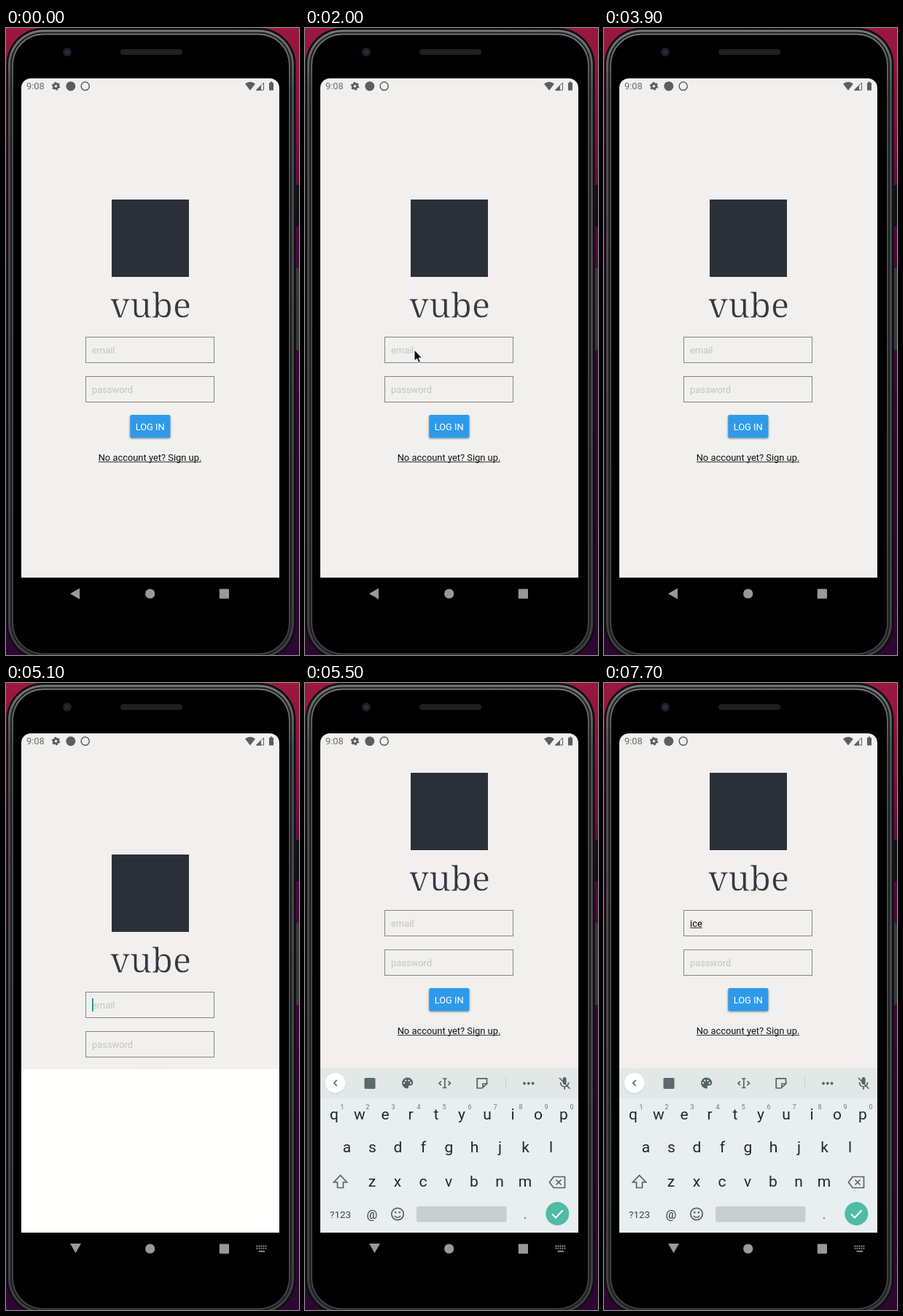
An HTML page that plays this animation: 402 by 859 pixels, repeating every 8 s.

```html
<!DOCTYPE html>
<html lang="en">
<head>
<meta charset="utf-8">
<title>Login screen</title>
<style>
html, body { margin: 0; width: 100%; height: 100%; overflow: hidden; background: #000; }
svg { display: block; width: 100vw; height: 100vh; font: 12.9px Roboto, sans-serif; }
.hint { fill: #c3c3c1; }
.box { fill: none; stroke: #858585; }
.line { fill: none; stroke: #566366; stroke-width: 1.7; }
.mid { text-anchor: middle; }
#keys { font-size: 21px; fill: #1c2a2e; }
#keys .num { font-size: 9px; fill: #6a7679; }
</style>
</head>
<body>
<svg viewBox="0 0 402 859">
  <defs>
    <linearGradient id="wall" x2="0" y2="1">
      <stop offset="0" stop-color="#9b183f"/>
      <stop offset=".16" stop-color="#7d1040"/>
      <stop offset=".3" stop-color="#500a40"/>
      <stop offset=".6" stop-color="#360732"/>
      <stop offset="1" stop-color="#2d0632"/>
    </linearGradient>
    <linearGradient id="rim" x2="0" y2="1">
      <stop offset="0" stop-color="#75787a"/>
      <stop offset=".1" stop-color="#4a4d4f"/>
      <stop offset="1" stop-color="#3e4143"/>
    </linearGradient>
    <clipPath id="corners"><path d="M21 753V82a13 13 0 0 1 13-13H362a13 13 0 0 1 13 13V753Z"/></clipPath>
    <clipPath id="view"><rect id="viewBox" x="21" y="69" width="354" height="684"/></clipPath>
    <filter id="soft" x="-20%" y="-20%" width="140%" height="150%"><feGaussianBlur stdDeviation="1.4"/></filter>
  </defs>

  <!-- phone -->
  <rect width="402" height="859" fill="url(#wall)"/>
  <path d="M398 215h4v57h-4z" fill="#111114"/>
  <path d="M398 329h4v112h-4z" fill="#39393b"/>
  <rect x=".5" y="0" width="397" height="866" rx="50" fill="#0d0e10"/>
  <rect x="3" y="2.5" width="392" height="861" rx="48" fill="url(#rim)"/>
  <rect x="6" y="5.5" width="386" height="855" rx="45" fill="#1b1d1f"/>
  <rect x="8" y="7.5" width="382" height="851" rx="43" fill="url(#rim)"/>
  <rect x="10" y="9.5" width="378" height="847" rx="41"/>
  <circle cx="84" cy="33" r="6" fill="#1d1f24"/>
  <circle cx="84" cy="33" r="3" fill="#262c48"/>
  <rect x="157" y="29" width="85" height="8" rx="4" fill="#202022"/>

  <!-- screen -->
  <g clip-path="url(#corners)">
    <path d="M21 528H375V753H21Z" fill="#fffffd"/>
    <g clip-path="url(#view)">
      <path d="M21 69H375V753H21Z" fill="#f1f0ee"/>
      <g id="form">
        <rect x="145" y="235" width="106" height="106" fill="#2b3038"/>
        <text x="198.5" y="397" class="mid" font-family="Noto Serif, serif" font-size="47" fill="#343842" stroke="#f1f0ee" stroke-width=".8">vube</text>
        <rect class="box" x="109.5" y="423.5" width="176" height="35"/>
        <rect class="box" x="109.5" y="477.5" width="176" height="35"/>
        <text id="mail" x="118" y="446"></text>
        <path id="rule" stroke="#222" stroke-width=".9"/>
        <rect id="caret" y="432" width="1.8" height="18" fill="#0f967f"/>
        <text x="118" y="499.5" class="hint">password</text>
        <rect x="170" y="531.5" width="55.5" height="31" rx="2" fill="#0006" filter="url(#soft)"/>
        <rect x="170.3" y="530" width="55" height="31.5" rx="2" fill="#2f9aea"/>
        <text x="197.7" y="551" class="mid" fill="#fff">LOG IN</text>
        <text x="197.5" y="593" class="mid" fill="#111">No account yet? Sign up.</text>
        <path d="M127 594.5H268" stroke="#222" stroke-width=".9"/>
      </g>
    </g>
  </g>

  <!-- status bar -->
  <g fill="#5d5d5d">
    <text x="28" y="84" fill="#6c6c6c">9:08</text>
    <circle cx="68.5" cy="79.7" r="3.2" fill="none" stroke="#5d5d5d" stroke-width="2.8"/>
    <circle cx="68.5" cy="79.7" r="5" fill="none" stroke="#5d5d5d" stroke-width="1.6" stroke-dasharray="2.6 2.636"/>
    <circle cx="88.8" cy="79.7" r="6.5"/>
    <circle cx="108.7" cy="79.7" r="5.6" fill="none" stroke="#5d5d5d" stroke-width="1.5"/>
    <path d="M328 76.5Q335 71 342 76.5L335 85.5Z"/>
    <path d="M343.5 85 353.5 75V85Z" fill="none" stroke="#5d5d5d"/>
    <path d="M343 85.5 350 78.5V85.5Z"/>
    <path d="M361 75h1.7v-1.5h2.6v1.5h1.7v10.5h-6z"/>
  </g>

  <!-- navigation bar -->
  <g fill="#999">
    <path id="back"/>
    <circle cx="197.7" cy="775" r="6.6"/>
    <rect x="292.8" y="768.5" width="13.2" height="13.2" rx="1"/>
    <g id="switch" stroke="#999" stroke-width="1.8" stroke-dasharray="1.8 1.2">
      <path d="M343.5 771.5H358M343.5 774.7H358"/>
      <path d="M346.5 778.6H355" stroke-dasharray="none"/>
    </g>
  </g>

  <!-- keyboard, at rest position -->
  <g id="board">
    <path d="M21 528H375V753H21Z" fill="#e9eef0"/>
    <path d="M21 528H375V569H21Z" fill="#e2e8e5"/>
    <circle cx="41.5" cy="549" r="14" fill="#b9c0be" opacity=".5"/>
    <circle cx="41.5" cy="548" r="13.8" fill="#fff"/>
    <path class="line" d="M43.8 544l-4 4 4 4" stroke="#333"/>
    <rect x="81.5" y="541" width="15" height="15" rx="1.5" fill="#5d696c"/>
    <path d="M140.5 540.5a7.5 7.5 0 1 0 0 15c2.5 0 1-2.6 1.4-3.3 1-1.5 6.3.6 6.3-4.4 0-4-3.5-7.3-7.7-7.3" fill="#566366"/>
    <g fill="#e2e8e5"><circle cx="136" cy="548" r="1.2"/><circle cx="138.3" cy="544.6" r="1.2"/><circle cx="142.6" cy="544.6" r="1.2"/><circle cx="145" cy="548" r="1.2"/></g>
    <path class="line" d="M189 542h5.5M189 554.5h5.5M191.8 542v12.5M187 545.5l-3 2.8 3 2.8M196.5 545.5l3 2.8-3 2.8"/>
    <path class="line" d="M249.5 549V541.8H236.2V555H243l6.5-6H244v5"/>
    <path d="M275.5 539v18" stroke="#cbd2d0"/>
    <g fill="#566366"><circle cx="301" cy="548.5" r="1.9"/><circle cx="306.8" cy="548.5" r="1.9"/><circle cx="312.6" cy="548.5" r="1.9"/></g>
    <rect x="353.6" y="540" width="5" height="10" rx="2.5" fill="#566366"/>
    <path class="line" d="M350.5 547q.5 6 5.6 6 5-.1 5.6-6M356.1 553v4M349 541l14.5 15"/>
    <g id="keys"></g>
    <path class="line" d="M48.5 674.5 39.5 684H44.5V691.5H52.5V684H57.5Z"/>
    <path class="line" d="M341 676.5H356.5V691.5H341L335.5 684ZM344.5 680.5l7 7M351.5 680.5l-7 7"/>
    <text x="34" y="732.5" font-size="13.5" fill="#3a474a">?123</text>
    <text x="92" y="734" class="mid" font-size="16.5" fill="#2c393c">@</text>
    <circle class="line" cx="127" cy="727.5" r="8.2"/>
    <path class="line" d="M122.8 730q4.2 4.5 8.4 0"/>
    <circle cx="124.2" cy="725.3" r="1.3" fill="#566366"/><circle cx="129.8" cy="725.3" r="1.3" fill="#566366"/>
    <rect x="153" y="717" width="123.5" height="21.5" rx="2.5" fill="#c8cdcf"/>
    <text x="302" y="734" class="mid" font-size="17" fill="#2c393c">.</text>
    <circle cx="346.3" cy="727" r="16" fill="#4ebca6"/>
    <path d="M339 727.5l5 5 9.5-10" fill="none" stroke="#fff" stroke-width="2"/>
  </g>

  <path id="mouse" d="M0 0V15L3.5 12 6 17.5 8.5 16.4 6 11H10.5Z" fill="#111" stroke="#fff" stroke-width=".9"/>
</svg>
<script>
const $ = id => document.getElementById(id);
const set = (id, attrs) => { for (const k in attrs) $(id).setAttribute(k, attrs[k]); };
const show = (id, on) => set(id, { visibility: on ? 'visible' : 'hidden' });

const label = (x, y, text, cls) => `<text x="${x}" y="${y}" class="mid ${cls}">${text}</text>`;
const rows = [['qwertyuiop', 40, 598], ['asdfghjkl', 57.5, 643], ['zxcvbnm', 92, 690]];
$('keys').innerHTML = rows.map(([letters, x, y], row) => [...letters].map((c, i) =>
  label(x + 35 * i, y, c, '') + (row ? '' : label(x + 35 * i + 11, 584, (i + 1) % 10, 'num'))
).join('')).join('');

const blinks = [400, 900, 1400, 1900, 2400, 2900, 3500, 3900, 4600, 5400, 5800, 6300, 6800, 7700];
const strokes = [7000, 7200, 7300];
const path = [[61, 424], [110, 433], [140, 439], [150, 441]];
const passed = (list, t) => list.filter(x => x <= t).length;

function draw(t) {
  const focused = t >= 5100, open = t >= 5400, sliding = open && t < 5500;

  set('viewBox', { height: focused ? 460 : 684 });
  set('form', { transform: `translate(0 ${open ? -112 : 0})` });
  set('back', { d: focused ? 'M88 768H103L95.5 781Z' : 'M88 775 101 767.5V782.5Z' });
  show('switch', focused);
  show('board', open);
  set('board', { transform: `translate(0 ${sliding ? 9.5 : 0})`, opacity: sliding ? .84 : 1 });

  const typed = 'ice'.slice(0, passed(strokes, t));
  $('mail').textContent = typed || 'email';
  set('mail', { class: typed ? '' : 'hint' });
  const end = 118 + (typed ? $('mail').getComputedTextLength() : 0);
  set('rule', { d: `M118 447.5H${end}` });
  show('rule', typed);
  set('caret', { x: end });
  show('caret', passed(blinks, t) % 2);

  const step = Math.max(0, Math.min(3, Math.floor((t - 1700) / 100)));
  set('mouse', { transform: `translate(${path[step]})` });
  show('mouse', t >= 1700 && t < 2700);
}

const start = performance.now();
function tick() {
  draw((performance.now() - start) % 8000);
  requestAnimationFrame(tick);
}
tick();
</script>
</body>
</html>
```
